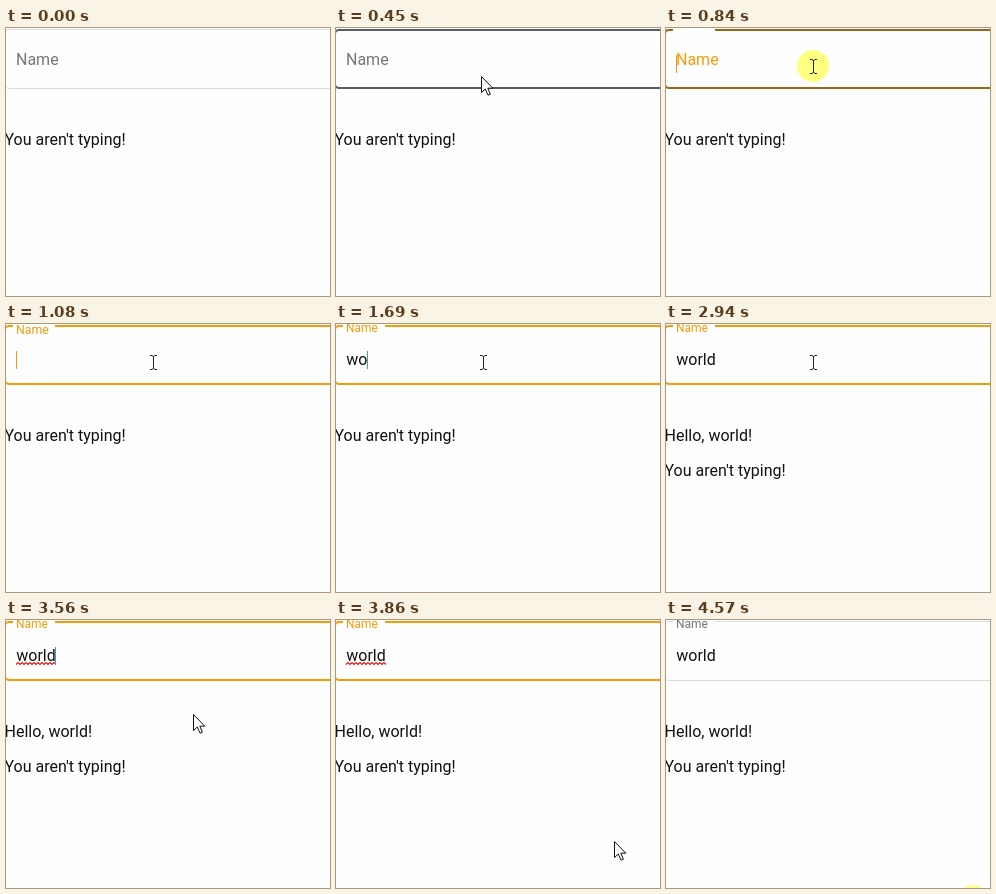
An HTML page for the animation above (4.64 s loop, 324 by 268 pixels).

```html
<!DOCTYPE html>
<html lang="en">
<head>
<meta charset="utf-8">
<title>Typing indicator</title>
<style>
  html, body { margin: 0; width: 100%; height: 100%; overflow: hidden; background: #fefefe; }
  svg { display: block; font: 16px Roboto, sans-serif; fill: #111; }
</style>
</head>
<body>
<svg width="324" height="268" viewBox="0 0 324 268">
  <path id="border" fill="none"/>
  <text id="label">Name</text>
  <text id="value" x="10.3" y="41"></text>
  <path id="squiggle" fill="none" stroke="#f01818" stroke-width="1.2"/>
  <rect id="caret" y="27" width="1" height="18"/>
  <text id="line1" x="-1.5" y="117"></text>
  <text id="line2" x="-1.5" y="152"></text>
  <circle id="press" r="16" fill="#ffff80"/>
  <path id="arrow" d="M.5 .5V16.5L4.3 13L7 19.2L9.4 18.2L6.8 12.2H11.8Z" fill="#fff" stroke="#111"/>
  <path id="beam" transform="translate(147 38)" d="M-3 -6.5H-1L.5 -5.5L2 -6.5H4M.5 -6V7M-3 7.5H-1L.5 6.5L2 7.5H4" fill="none" stroke="#222"/>
</svg>
<script>
// Moments of the loop, in ms
const LOOP = 4640, ENTER = 70, HOVER = 440, OVER = 530, FOCUS = 840,
  GREET = 2940, SPELL = 3170, LEAVE = 3560, GONE = 4250, BLUR = 4570;
const WORD = 'world', KEYS = [1370, 1690, 1860, 2010, 2160];
const STEP = 75, BLINK = 530;
const ORANGE = '#f69c0b';

const $ = id => document.getElementById(id);
const set = (id, attrs) => { for (const k in attrs) $(id).setAttribute(k, attrs[k]); };
const show = (id, on) => set(id, { visibility: on ? 'visible' : 'hidden' });
const lerp = (a, b, p) => a + (b - a) * p;
const mix = (a, b, p) => `color-mix(in srgb, ${b} ${p * 100}%, ${a})`;
const hold = (t, start) => start + Math.floor((t - start) / STEP) * STEP;
const easeOut = (t, start, span, power = 3) =>
  1 - (1 - Math.min(1, Math.max(0, (t - start) / span))) ** power;

let zigzag = 'M10 44.5';
for (let x = 12; x <= 50; x += 2) zigzag += `L${x} ${x % 4 ? 44.5 : 42.5}`;
set('squiggle', { d: zigzag });

function borderColor(t) {
  if (t < HOVER || t >= BLUR) return '#ddd';
  if (t < FOCUS) return mix('#6c6c6c', '#212121', easeOut(t, HOVER, 150));
  return mix('#996414', ORANGE, easeOut(t, FOCUS, 240));
}

function drawField(t) {
  const focused = t >= FOCUS && t < BLUR;
  const w = t >= HOVER && t < BLUR ? 2 : 1, i = w / 2, r = 5 - i, top = 1 + i;
  const arc = `A${r} ${r} 0 0 1 `;
  set('border', {
    d: `M330 ${61 - i}H3${arc}${i - 2} 56V6${arc}3 ${top}H${t >= FOCUS ? `7M49 ${top}H330` : 330}`,
    'stroke-width': w
  });
  $('border').style.stroke = borderColor(t);
  const p = easeOut(hold(t, FOCUS), FOCUS, 390);
  set('label', {
    transform: `translate(10 ${lerp(37, 8, p)}) scale(${lerp(1, .75, p)})`,
    fill: focused ? ORANGE : '#757575'
  });
}

function drawText(t) {
  const typed = KEYS.filter(k => k <= t), done = typed.length === KEYS.length;
  const greeted = t >= GREET, idle = "You aren't typing!";
  $('value').textContent = WORD.slice(0, typed.length);
  $('line1').textContent = greeted ? `Hello, ${WORD}!` : done ? 'You are typing!' : idle;
  $('line2').textContent = greeted ? idle : '';

  const since = t - (typed.at(-1) ?? FOCUS);
  show('caret', since >= 0 && t < BLUR && Math.floor(since / BLINK) % 2 === 0);
  set('caret', { x: Math.round(10 + $('value').getComputedTextLength()), fill: typed.length ? '#4f9db5' : ORANGE });
  show('squiggle', t >= SPELL && t < BLUR);
}

function drawPointer(t) {
  const entering = t >= ENTER && t < OVER, leaving = t >= LEAVE && t < GONE;
  show('arrow', entering || leaving);
  show('beam', t >= OVER && t < LEAVE);
  const p = entering
    ? easeOut(hold(t, ENTER), ENTER, OVER - ENTER, 2)
    : easeOut(hold(t, LEAVE), LEAVE - STEP, GONE - LEAVE + STEP);
  const [x, y] = entering
    ? [lerp(235, 142, p), lerp(262, 40, p)]
    : [lerp(147, 298, p), lerp(38, 249, p)];
  set('arrow', { transform: `translate(${Math.round(x)} ${Math.round(y)})` });

  show('press', t >= FOCUS && t < FOCUS + 2 * STEP || t >= BLUR);
  set('press', t < BLUR ? { cx: 147, cy: 38 } : { cx: 307, cy: 281 });
}

const start = performance.now();
function tick() {
  const t = (performance.now() - start) % LOOP;
  drawField(t);
  drawText(t);
  drawPointer(t);
  requestAnimationFrame(tick);
}
tick();
</script>
</body>
</html>
```
